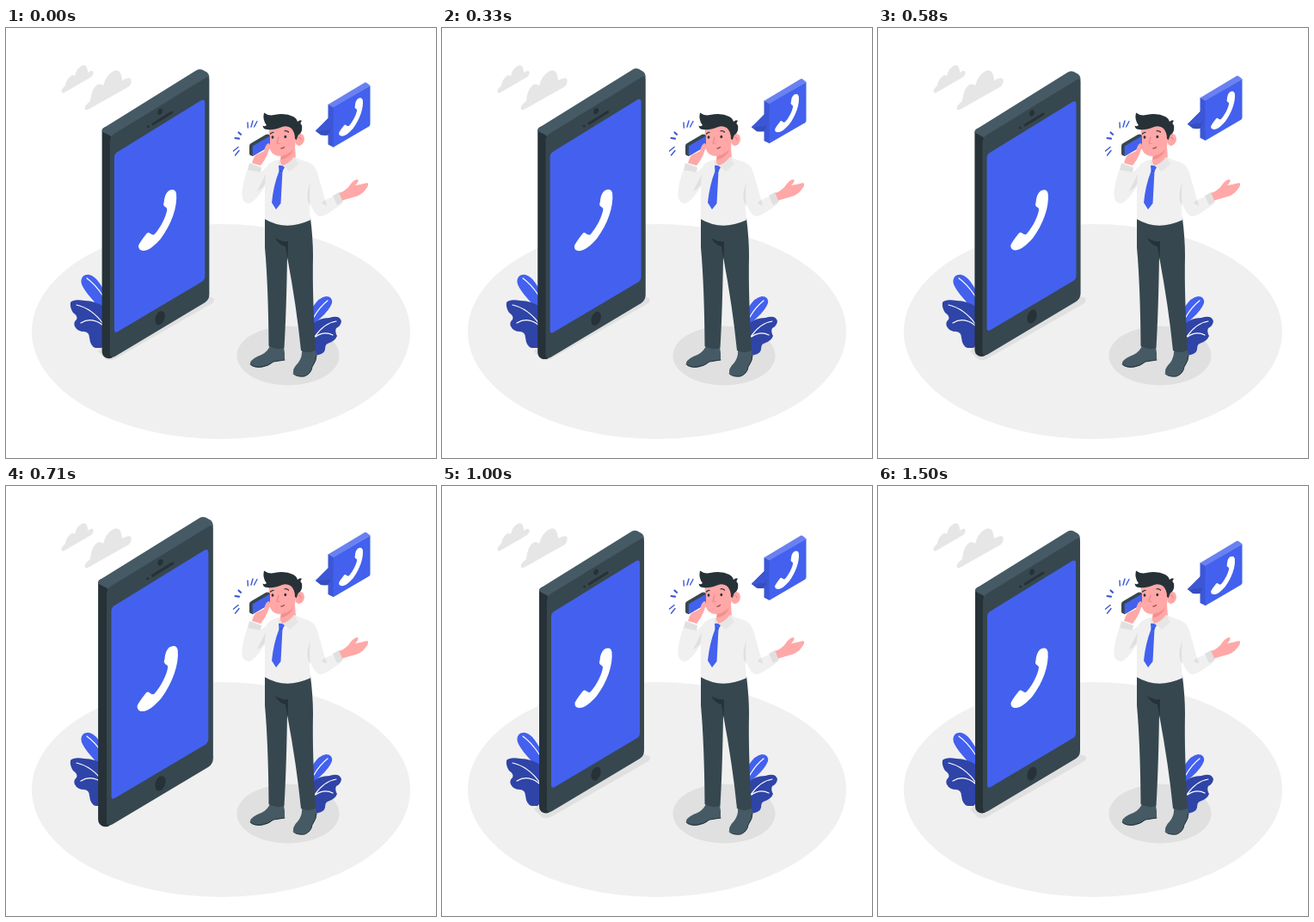
Recreate the animation shown at these times as an HTML page. Size 500 px wide and 500 px high, loop 1540 ms.

```html
<!DOCTYPE html>
<html lang="en">
<head>
<meta charset="utf-8">
<title>Phone call</title>
<style>
html, body { margin: 0; width: 100%; height: 100%; overflow: hidden; background: #fff; }
svg { display: block; width: 100vw; height: 100vh; }
.blue { fill: #4361ee; }
.navy { fill: #2f44a7; }
.ink { fill: #263238; }
.slate { fill: #37474f; }
.steel { fill: #455a64; }
.skin { fill: #ffa8a7; }
.shirt { fill: #f0f0f0; }
.shade { fill: #e0e0e0; }
.line { fill: none; stroke-linecap: round; stroke-linejoin: round; }
</style>
</head>
<body>
<svg viewBox="0 0 500 500">
  <defs>
    <path id="handset" fill="#fff" d="M183.500 203Q184 194 188.500 190Q196 186 197.500 193C199 208 192 228 180 244C173 252 166 258 160 258Q154 258 154.500 252Q157 247 163 239.500Q165 236 168 238.500Q171 241 173 239C180 231 186 219 187 211Q187 209 184.500 208Q182 206 183.500 203Z"/>
  </defs>

  <ellipse cx="250" cy="353" rx="220" ry="125" fill="#f0f0f0"/>
  <ellipse class="shade" cx="328" cy="381" rx="59.5" ry="34.5"/>

  <g id="clouds" fill="#e6e6e6">
    <path d="M65 75Q63 72 69 67Q70 60 75 56Q77 54 80 56Q82 47 88 44Q94 41 95 50L95 52Q99 49 101 50Q103 53 99 57L68 75Q66 76 65 75Z"/>
    <path d="M92 95Q90 91 98 85Q99 71 106 66Q110 64 113 67Q116 55 125 50Q134 46 135 61Q142 57 145 59Q147 63 143 68L97 94Q93 96 92 95Z"/>
  </g>

  <g id="plants">
    <path class="blue" d="M115 332C103 318 92 308 88 298C86 291 90 286 97 287C105 289 110 298 115 307Z"/>
    <path class="navy" d="M115 372L104 372Q98 370 97 360Q97 354 91 353Q83 353 80 347Q78 342 82 339Q84 335 78 331Q74 325 75 319Q79 315 91 317Q104 317 115 325Z"/>
    <path class="blue" d="M357 324Q364 313 372 312Q380 312 379 320Q376 328 366 337L357 345Z"/>
    <path class="navy" d="M357 344Q364 337 376 337Q388 333 390 341Q389 347 384 349Q382 353 385 358Q383 364 374 367Q371 368 371 374Q370 380 357 381Z"/>
    <path class="line" stroke="#fff" stroke-width="1.2" d="M94 291Q104 298 113 312M82 322Q100 326 113 344M87 343Q100 335 113 346M374 317Q365 324 358 336M384 341Q370 343 359 359M380 357Q370 352 360 359"/>
  </g>

  <path class="shade" d="M107 376L113 370L235 312L241 314Q243 317 240 320L128 384Q121 388 116 385Z"/>

  <g id="phone">
    <path class="ink" d="M113 122L113 372.500Q113 377.500 117 379.500Q120 381 124 380L140 367L140 110L116 117.800Q113 119 113 122Z"/>
    <path class="steel" d="M113 122.500Q113 119.500 116 117.800L219 53.800Q223 50.600 227 52.300L232 55Q235 57 235 62L126 131L122 127Z"/>
    <path class="slate" d="M122 134Q122 128 127 125L230 62Q235 59 235 64L235 307.500Q235 314 230 317L128 378Q122 381 122 374Z"/>
    <path class="blue" d="M127 152Q127 148 130 146L226 87Q230 85 230 90L230 287Q230 291 227 293L131 350Q127 352 127 348Z"/>
    <g class="ink">
      <ellipse cx="179" cy="100" rx="2.7" ry="3.6" transform="rotate(25 179 100)"/>
      <circle cx="165.6" cy="117" r="1.4"/>
      <ellipse cx="179" cy="334.500" rx="5.2" ry="8.2" transform="rotate(20 179 334.5)"/>
    </g>
    <path class="line" stroke="#263238" stroke-width="3" d="M171 114L192 101"/>
    <use href="#handset"/>
  </g>

  <g id="bubble">
    <path fill="#364ebe" d="M376 104L362 118Q359 120 361 121L366 125Q373 126 381 124L381 106Z"/>
    <path fill="#3c57d6" d="M376 104L362 118Q359 120 361 121Q368 119 376 119Z"/>
    <path fill="#3c57d6" d="M374.5 89L381 92.5L381 139.200L374.5 136L374.5 124L377 120L374.5 106Z"/>
    <path fill="#6981f1" d="M374.5 89.5L417 64Q418 63.5 419 64L423.500 67.5L381 93Z"/>
    <path class="blue" d="M380.5 92.8L423.500 67.5L423.500 112.300Q423.500 114 422 115L380.5 139.200Z"/>
    <use href="#handset" transform="translate(287.5 -39) scale(.645 .64)"/>
  </g>

  <g id="man">
    <path class="steel" d="M307 369Q305 376 297 380Q286 384 284 389Q283 394 294 395Q305 394 311 388Q318 387 324 386L324 378L323 371Z"/>
    <path class="steel" d="M344 373Q345 382 340 389Q333 396 334 401Q337 406 347 405Q355 402 356 394Q362 386 361 379L360 373Z"/>
    <path class="line" stroke="#263238" stroke-width="1" d="M284 391Q288 395 297 394Q305 393 311 388L324 386M334 402Q338 406 347 405Q355 402 356 394Q361 387 361 381"/>
    <path class="slate" d="M301 220L354 221Q357 245 357 265Q356 310 360 375Q351 379 343 375Q338 325 327 266Q326 330 323.500 372Q314 375 305.500 370Q305 300 301 255Z"/>
    <path class="ink" d="M313 244Q320 249 328 248L327.5 270L325 254Q317 252 313 244Z"/>

    <path class="skin" d="M320 145L318 158L326 164L337 152L336 138Z"/>
    <path class="shirt" d="M317 153Q306 155 302 163L296 168L281 164Q275 180 274.500 192Q274 204 283 204Q291 201 301 184L301 222.300Q325 236.500 354 223.300L352 198Q358 219 366 219Q373 218 391 204L385 194L371 200L362 168Q358 156 345 154L335 150Q328 159 321 160Z"/>
    <path class="shade" d="M283 157L297 162L296 168L281 165Z"/>
    <path class="shade" d="M380 195L388 190.500L392 202L385 206Z"/>
    <path class="shade" d="M302 170Q297 180 292 190Q298 187 301 182ZM354 180Q349 190 351 202L354 207Q352 195 354 180ZM371 200L367 203Q370 207 373 206Z"/>
    <path fill="#e6e6e6" d="M317 153L317 161L321 159.500ZM335 150L340 158L330 167L322 160Q329 158 335 150Z"/>
    <path class="blue" d="M317 160Q321 159 324 162L321.500 166.500L319.500 204L314 211L309 203Q311 183 317.500 166.500Z"/>
    <path class="line" stroke="#364ebe" stroke-width=".8" d="M318 166L321.500 166.500"/>

    <path class="skin" d="M306 115Q305 130 307 141Q310 149 319 149Q330 147 336 138L338 118Q320 106 306 115Z"/>
    <ellipse class="skin" cx="341.500" cy="130" rx="5.300" ry="7" transform="rotate(15 341.500 130)"/>
    <path fill="#f28f8f" d="M320 149Q329 147 334 141Q331 151 320 153Z"/>
    <path class="ink" d="M300 98.500Q305 102.500 312 101Q325 98.500 334 103Q338 105 339 109Q342 106 344 108Q341 111 344 113Q345 119 342 123Q339 124 338 130L336 129Q336 120 331 116Q326 113 321 115Q311 119 304 118Q299 118 298.500 113.500Q301 115 303 113Q298 107 300 98.500Z"/>
    <g class="ink">
      <ellipse cx="310" cy="127" rx="1.400" ry="1.800"/>
      <ellipse cx="324.800" cy="126.500" rx="1.400" ry="1.800"/>
    </g>
    <path class="line" stroke="#263238" stroke-width="1.200" d="M307.500 123Q309 121.300 311 121.300M324 119.800Q326.500 119 328.500 121"/>
    <path class="line" stroke="#ee8585" stroke-width="1.100" d="M317 127L315 134L318 134.500M340 127Q343 127 343 130"/>
    <path class="line" stroke="#a34a50" stroke-width="1.300" d="M320 140Q322 140 323.500 138.500"/>

    <path class="slate" d="M283 137Q283 135 285 134L302 124Q304 123 306 124L307 126L307 137L287 149L284 148Q283 147 283 146Z"/>
    <path class="blue" d="M286.800 137.300L307 125.500L307 137.500L286.800 148.700Z"/>
    <path class="skin" d="M286 157Q287 152 290 148L300 143Q302 134 306 134L308 138Q305 142 304 147Q301 154 296 160Z"/>
    <path class="skin" d="M387.500 192Q395 189 399 184Q404 176 409 176Q411 178 406 183Q413 182 420 180Q423 182 418 188Q413 195 403 197L391 200.500Z"/>
  </g>

  <g class="line" stroke="#3c57d6" stroke-width="1.400">
    <path d="M264.500 143L270 138.500M266.500 148L271 142.500M281 110L281.300 116M287 108L285 115M292 108.500L288.500 115"/>
    <path stroke-width="2.200" d="M266.500 128L271 128.700M270.500 121.500L273 123.800"/>
  </g>
</svg>
<script>
const LOOP = 1540, CYCLE = 1500, LEAD = 34;
const BEAT = [[0, 1], [0.1, 1.1], [0.3, 1], [0.4, 1], [0.5, 1.1], [0.6, 1], [1, 1]];
const FLOAT = [[0, 0], [0.5, -10], [1, 0]];
const phone = document.getElementById('phone');
const bubble = document.getElementById('bubble');

// Linear interpolation between [position, value] keys
function track(keys, p) {
  const i = Math.max(1, keys.findIndex(k => k[0] >= p));
  const [p0, v0] = keys[i - 1], [p1, v1] = keys[i];
  return v0 + (v1 - v0) * (p - p0) / (p1 - p0);
}

function draw(ms) {
  const p = Math.min(ms % LOOP + LEAD, CYCLE) / CYCLE;
  phone.setAttribute('transform', `translate(174.2 216) scale(${track(BEAT, p)}) translate(-174.2 -216)`);
  bubble.setAttribute('transform', `translate(0 ${track(FLOAT, p)})`);
}

let start;
function tick(now) {
  if (start === undefined) start = now;
  draw(Math.max(0, now - start));
  requestAnimationFrame(tick);
}
draw(0);
requestAnimationFrame(tick);
</script>
</body>
</html>
```
